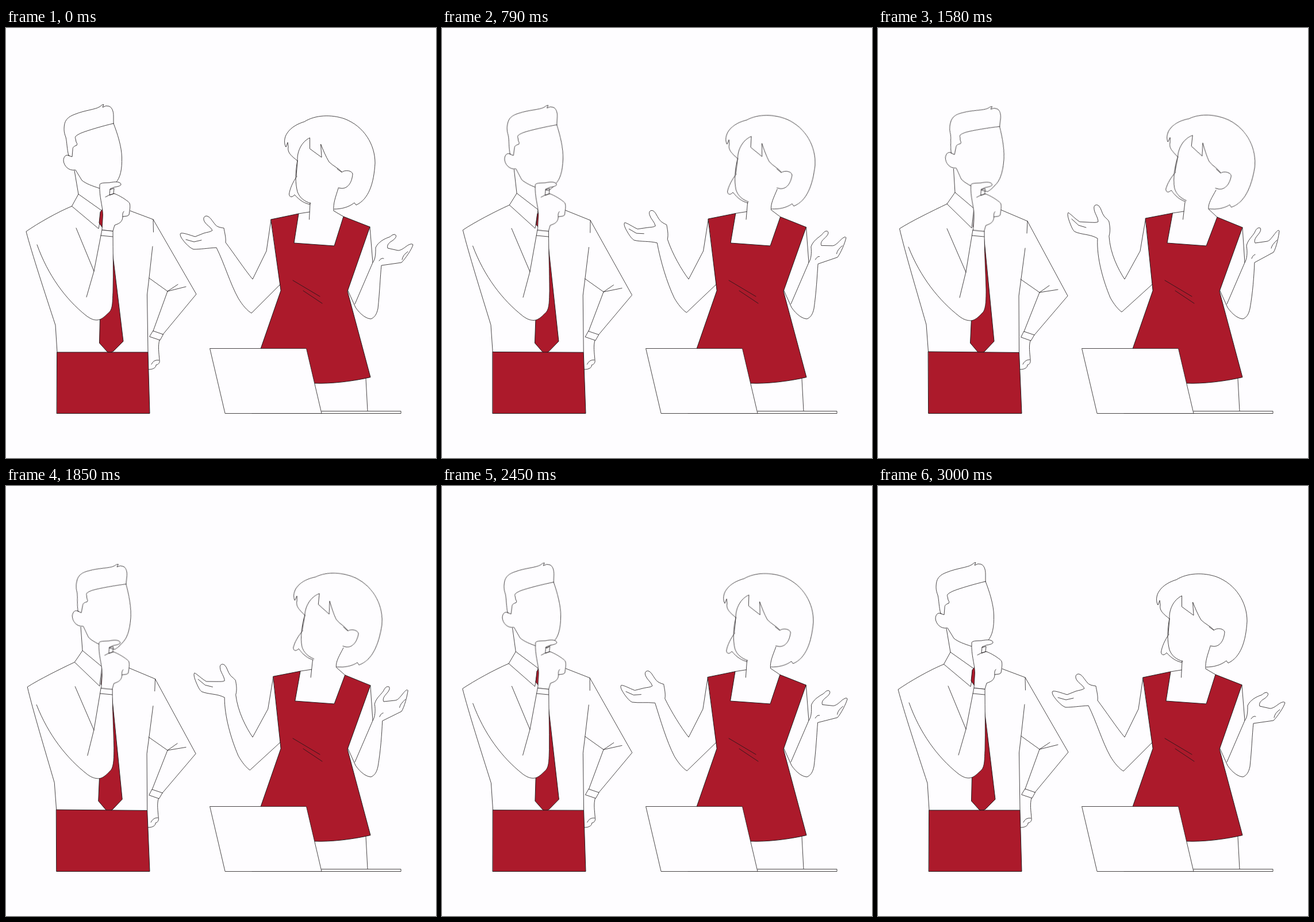
An HTML page for the animation above (3.03 s loop, 748 by 748 pixels).

```html
<!DOCTYPE html>
<html lang="en">
<head>
<meta charset="utf-8">
<title>Two colleagues talking</title>
<style>
  html, body { margin: 0; width: 100%; height: 100%; overflow: hidden; background: #fefdff; }
  svg { display: block; width: 100vw; height: 100vh; }
  path { fill: none; stroke: #1b1719; stroke-width: .8; stroke-linejoin: round; stroke-linecap: round; }
  .skin { fill: #fefdff; }
  .red { fill: #ac1a2b; stroke-width: .95; }

  /* --b holds the far pose of a bending shape */
  .bend { animation: bend 3030ms infinite; }
  .head { animation: nod 3030ms infinite; }
  .fist { animation: shift 3030ms infinite; }
  .bend, .head, .fist { animation-timing-function: cubic-bezier(.42, 0, .62, 1); }
  .man.head { --turn: 7deg; transform-origin: 155px 370px; }
  .woman.head { --turn: 6.3deg; transform-origin: 577px 360px; }
  @keyframes bend  { 50% { d: var(--b); animation-timing-function: cubic-bezier(.38, 0, .58, 1); } }
  @keyframes nod   { 50% { transform: rotate(var(--turn)); animation-timing-function: cubic-bezier(.38, 0, .58, 1); } }
  @keyframes shift { 50% { transform: translate(-1.5px, .5px); animation-timing-function: cubic-bezier(.38, 0, .58, 1); } }
</style>
</head>
<body>
<svg viewBox="0 0 748 748">
  <!-- man: arm on hip -->
  <path class="bend" d="M216,318 L256,333 L331,463 L273,533 M256,333 L256.5,355"
    style="--b:path('M213,316 L260,336 L330,466 L272,534 M260,336 L259,357')"/>
  <path class="bend" d="M249,435 L281,458 L313,450 M281,458 L299,446 M281,458 L256,527"
    style="--b:path('M248,437 L281,460 L313,455 M281,460 L298,448 M281,460 L254,528')"/>
  <path class="bend" d="M256,527 L273.5,533 L268,543 L250,537 Z M267,543 C264,553 266,565 267,578 C268,583 264,586 261,586 C261,591 256,594 248,594 M266,578 C260,577 256,579 253,585"
    style="--b:path('M254,528 L272,534 L266,544 L249,538 Z M265,544 C262,553 264,565 265,577 C266,583 262,586 260,586 C260,591 255,594 247,594 M264,577 C259,577 255,579 252,585')"/>

  <!-- man: shirt, tie, trousers -->
  <path class="bend" d="M114.500,310 C90,320 55,340 35,354 C45,392 68,462 86,517 L89,564 M255,380 L249,434 L245.500,464 L247,564"
    style="--b:path('M120,306 C95,318 58,336 37.5,349 C47,390 68,460 84,516 L87.500,563 M256,383 L249,436 L245,466 L245.500,564')"/>
  <path class="bend" d="M119,248 L126,289 L114.500,310 L161,349 L167,318 L126,289"
    style="--b:path('M131.500,245 L134,286 L120,306 L163,348 L167,314 L134,286')"/>
  <path class="red bend" d="M169,314 L164,320 L162,339 L169,349 Z"
    style="--b:path('M168,326 L167.500,328 L165.500,346 L168,345 Z')"/>
  <path class="red bend" d="M185,388 L204,545 L187,562 Q181,566 176,563 L162.500,548 L163.500,505 L178,480 Z"
    style="--b:path('M184,360 L202,545 L185,563 Q179,567 174,564 L160.500,548 L162.500,505 L178,480 Z')"/>
  <path class="red bend" d="M89,564 L247,564 L250,670.500 L88.500,670.500 Z"
    style="--b:path('M87.500,563 L245.500,564.500 L250,670.500 L88,670.500 Z')"/>

  <!-- man: head -->
  <g class="man head">
    <path d="M109,222 C106,211 106,198 104,190 C100,180 101,174 101.500,169 C103,159 109,154 120,150 C137,143 155,142 163,137 Q167,133 170,133 L168,138 Q174,134 179,136 C185,138 187,146 187,153 L187,166"/>
    <path d="M187,166 C170,170 142,178 130,183 C122,187 119,189 121,193 L122,198 Q125,202 123,204 C117,206 116,208 116,212 L115,224 L109,222"/>
    <path d="M187,166 C194,184 201,206 201.500,225 C202,246 199,260 191,269 Q186,277 180,281 L163,279 C151,275 139,271 132,265 L121,247"/>
    <path d="M110,222 C104,219 100,224 100,231 C101,240 109,249 120,247"/>
  </g>

  <!-- man: thinking arm -->
  <path class="skin bend" d="M54,377 C73,430 103,471 139,500 C147,506 152,508 158,508 C167,508 174,499 180,494 C186,487 185,475 186,460 C187,425 186,390 186,353 L167,351 L153,423 L140,468"
    style="--b:path('M53,381 C74,434 106,474 142,502 C150,508 156,509 162,509 C171,508 178,499 183,494 C188,487 188,470 188,455 C187,420 185,390 185,353 L165,351 L153,424 L142,469')"/>
  <path class="bend" d="M122,348 L153,423 M165,361 L185.500,363"
    style="--b:path('M120,349 L153,425 M163.500,361 L184.500,363')"/>
  <g class="fist">
    <path class="skin" d="M167,351 L168.500,325 C168,308 162,294 163,273 C163,269 172,269.500 180,269 C190,267 199,267 200,272 C200,275 193,276 188,277 L181,280 L180,291 L188,288 C195,290 210,299 214.500,304 C217,309 215,317 214,325 L211,327 L203,328 C203,335 199,339 194,341 L189,343 L186,353 Z"/>
    <path d="M173,294 Q181,289 188,288 M203,328 Q202,322 205,319 M181,281 L188,279 L187,288"/>
  </g>

  <!-- woman: arms -->
  <path class="bend" d="M461,334 L453,388 L429,437 C415,420 397,393 382,373 C383,365 380,355 379,348 C372,347 367,346 364,342 C358,335 355,328 349,327 C344,327 342,332 346,338 C349,343 356,346 359,352 C356,355 350,355 344,357 L329,363 C319,360 309,356 304,357 C301,360 306,367 312,374 C317,379 321,383 326,385 C338,385 350,383 366,382 C380,410 390,445 404,470 C411,482 420,492 427,496 L477,446 M313,368 L327,372 L340,369"
    style="--b:path('M465.500,332 L456,388 L429,437 C418,420 404,393 402,362 C405,352 403,343 402,337 C401,334 397,331 394,328 C389,322 389,314 384,309 C380,306 375,308 376,314 C376,321 383,329 383,337 C380,339 375,338 369,338 L351,337 C343,332 335,323 331,321 C329,324 331,331 334,339 C337,347 339,351 342,354 C355,360 369,358 382,366 C380,400 392,440 404,469 C410,480 418,490 424,494 L477,446 M337,332 L349,343 L362,347')"/>
  <path class="bend" d="M633,346 L638,408 L607,480 M594,455 L608,486 C616,498 627,506 635,506 C642,503 645,497 647,488 C650,460 651,432 653,413 L688,408 C694,402 706,385 708,377 C706,374 700,377 696,380 C691,384 686,387 682,387 L664,383 C662,377 667,373 672,370 C678,366 681,361 676,359 C671,359 670,363 666,364 C657,367 647,373 643,382 C643,392 643,402 638,408 M649,405 Q653,399 657,401 M699,389 Q690,395 689,403"
    style="--b:path('M634,347 L638,408 L607,480 M594,455 L608,486 C616,498 627,506 635,506 C642,503 645,497 647,488 C652,460 654,432 655,408 L688,390 C693,382 697,362 698,353 C696,349 691,357 687,362 C683,367 681,370 677,371 L656,374 C654,370 656,366 659,362 C664,356 667,352 665,348 C660,346 657,351 655,356 C650,364 643,369 641,379 C643,390 642,402 638,408 M650,401 Q652,395 656,394 M694,369 Q685,377 684,383')"/>

  <!-- woman: neck and dress -->
  <path class="bend" d="M529,304 L527.500,333 M509,323 L528,320 M578,279 C573,295 569,305 570,318 L587,328"
    style="--b:path('M534,303 L530.500,333 M512,322 L532,319 M588,282 C581,295 574,305 575,315 L590,329')"/>
  <path d="M626,610 L629,666"/>
  <path class="red bend" d="M461,333 L509,323 L501,374 L571,379 L587,328 L633,346 L594,458 L634,607.500 C602,615 565,619 537,618 L443,558 L478,457 Z"
    style="--b:path('M465.500,331 L512.500,322 L503,374 L571,379 L590,329 L634,347 L594,458 L634,607.500 C602,615 565,619 537,618 L443,558 L478,457 Z')"/>
  <path stroke-width="1" d="M499,439 L546,467 M517,457 L550,479"/>

  <!-- woman: head -->
  <g class="woman head">
    <path d="M507,231 C497,223 489,217 491,207 L490,199 L487,207 C483,201 484,190 489,183 C496,172 509,166 519,163 C538,151 566,150 589,158 C623,171 642,203 642,235 C640,270 631,298 609,308 L606,304 C596,312 583,315 571,315"/>
    <path d="M505,258 L507,231 C506,215 514,198 528.500,191 L528.500,210 L549,225 L547.500,202 C552,213 556,223 562,233 C569,240 577,243 584,250"/>
    <path d="M507,231 C503,250 503,270 507,285 C511,296 520,302 530,305 M506,258 C499,268 494,279 492.500,289 C493,294 497,296 502,290 C511,300 519,305 529,307"/>
    <path d="M576,245 L584,251 C590,246 602,248 603,254 C602,267 596,279 584,279 L578,278"/>
  </g>

  <!-- laptop and table -->
  <path class="skin" d="M549,666.500 H687 V670.500 H428"/>
  <path class="skin" stroke-width="1" d="M355,557.500 H522.500 L549,670.500 H381.500 Z"/>
</svg>
</body>
</html>
```
